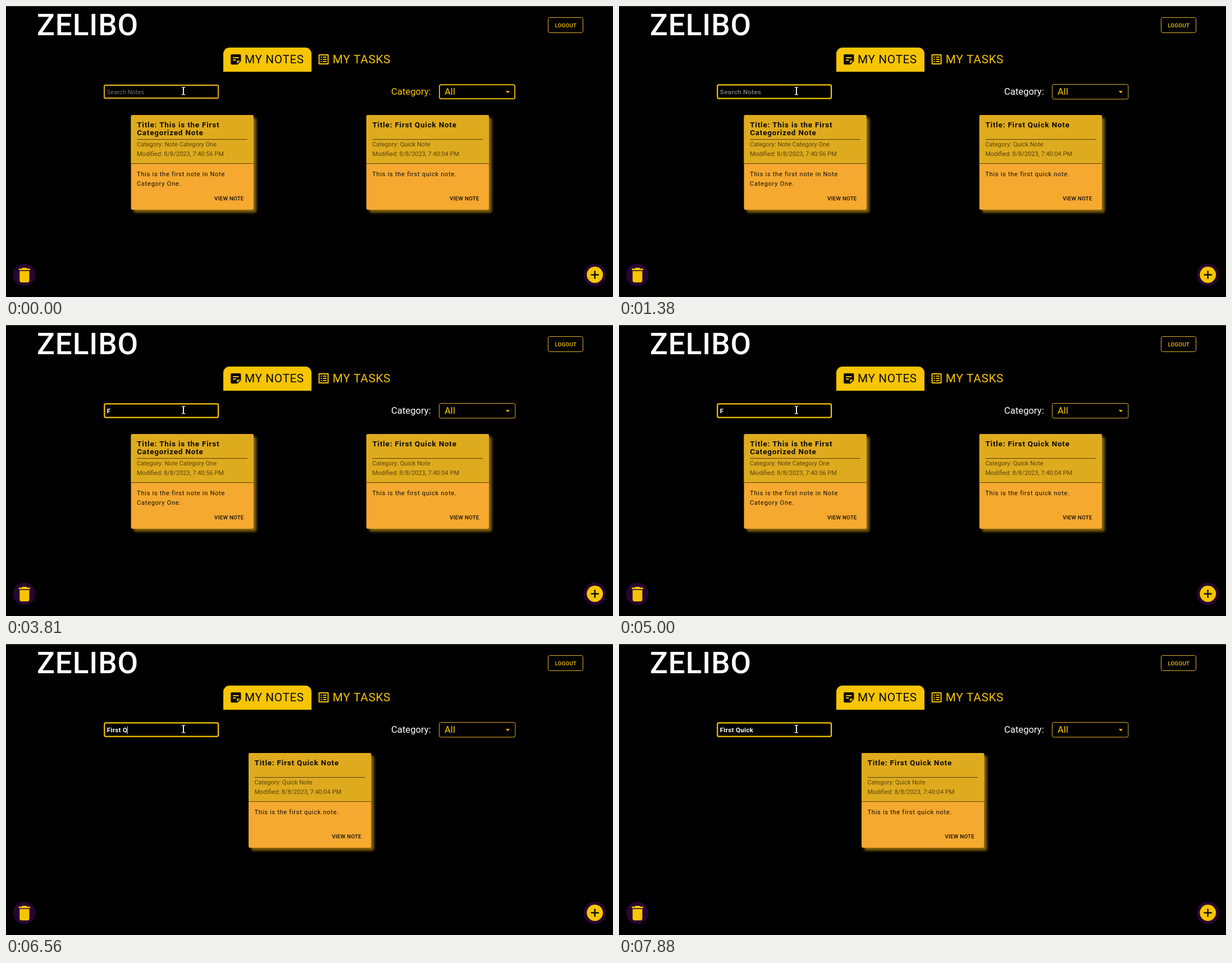
Recreate the animation shown at these times as an HTML page with a canvas. Size 1081 px wide and 518 px high, loop 8000 ms.

```html
<!DOCTYPE html>
<html lang="en">
<head>
<meta charset="utf-8">
<title>Notes search</title>
<style>
  html, body { margin: 0; width: 100%; height: 100%; overflow: hidden; background: #000; }
  canvas { display: block; }
</style>
</head>
<body>
<canvas id="stage" width="1081" height="518"></canvas>
<script>
const ctx = document.getElementById('stage').getContext('2d');
const LOOP = 8000;
const YELLOW = '#f7c504';
const GOLD = '#e0b028';
const PURPLE = '#270530';

const ICONS = {
  note: new Path2D('M19 3H4.99C3.89 3 3 3.9 3 5l.01 14c0 1.1.89 2 1.99 2h10l6-6V5c0-1.1-.9-2-2-2zM7 8h10v2H7V8zm5 6H7v-2h5v2zm2 5.5V14h5.5L14 19.5z'),
  list: new Path2D('M19 5v14H5V5h14m1.1-2H3.9c-.5 0-.9.4-.9.9v16.2c0 .4.4.9.9.9h16.2c.4 0 .9-.5.9-.9V3.9c0-.5-.5-.9-.9-.9zM11 7h6v2h-6V7zm0 4h6v2h-6v-2zm0 4h6v2h-6zM7 7h2v2H7zm0 4h2v2H7zm0 4h2v2H7z'),
  trash: new Path2D('M6 19c0 1.1.9 2 2 2h8c1.1 0 2-.9 2-2V7H6v12zM19 4h-3.5l-1-1h-5l-1 1H5v2h14V4z')
};

// [start, typed text, caret visible]
const TYPING = [
  [0, '', false], [750, '', true], [1380, '', false],
  [2000, 'F', true], [2630, 'F', false], [3190, 'F', true],
  [3810, 'F', false], [4440, 'F', true], [5000, 'F', false],
  [5190, 'First', true], [5810, 'First', false], [6060, 'First ', true],
  [6560, 'First Q', true], [6810, 'First Qu', true], [7060, 'First Qui', true],
  [7130, 'First Quic', true], [7380, 'First Quick', true], [7880, 'First Quick', false]
];

const NOTES = [
  {
    title: ['Title: This is the First', 'Categorized Note'],
    meta: ['Category: Note Category One', 'Modified: 8/8/2023, 7:40:56 PM'],
    body: ['This is the first note in Note', 'Category One.']
  },
  {
    title: ['Title: First Quick Note'],
    meta: ['Category: Quick Note', 'Modified: 8/8/2023, 7:40:04 PM'],
    body: ['This is the first quick note.']
  }
];

function text(str, x, y, size, color, weight = 400, spacing = 0) {
  ctx.font = `${weight} ${size}px Roboto, sans-serif`;
  ctx.letterSpacing = spacing + 'px';
  ctx.fillStyle = color;
  ctx.fillText(str, x, y);
  return ctx.measureText(str).width;
}

function lines(list, x, y, pitch, ...style) {
  list.forEach((s, i) => text(s, x, y + i * pitch, ...style));
}

function rect(x, y, w, h, color) {
  ctx.fillStyle = color;
  ctx.fillRect(x, y, w, h);
}

function box(x, y, w, h, radius) {
  ctx.beginPath();
  ctx.roundRect(x, y, w, h, radius);
}

function outline(x, y, w, h, radius, color, width) {
  box(x, y, w, h, radius);
  ctx.strokeStyle = color;
  ctx.lineWidth = width;
  ctx.stroke();
}

function disc(x, y, r, color) {
  ctx.fillStyle = color;
  ctx.beginPath();
  ctx.arc(x, y, r, 0, Math.PI * 2);
  ctx.fill();
}

function icon(path, x, y, scale, color) {
  ctx.save();
  ctx.translate(x, y);
  ctx.scale(scale, scale);
  ctx.fillStyle = color;
  ctx.fill(path, 'evenodd');
  ctx.restore();
}

function drawHeader() {
  rect(0, 0, 1081, 1, '#3b4d40');
  text('ZELIBO', 55, 52, 53, '#fff', 500, 0.9);
  outline(965.5, 20.5, 62, 27, 3, GOLD, 1);
  text('LOGOUT', 977.4, 37.5, 9.7, YELLOW, 500, 0.28);

  ctx.fillStyle = YELLOW;
  box(387, 74, 157, 43, [11, 11, 0, 0]);
  ctx.fill();
  icon(ICONS.note, 397.2, 83, 1.01, '#0a0a0a');
  text('MY NOTES', 425, 102, 20.8, '#0a0a0a', 400, 0.6);
  icon(ICONS.list, 553.6, 83, 1, YELLOW);
  text('MY TASKS', 581.8, 102, 20.8, YELLOW, 400, 0.6);
}

function drawSearch(typed, caret, focused) {
  if (focused) outline(175.3, 140.4, 202.8, 24.2, 2.5, YELLOW, 2.2);
  else outline(175, 141, 203, 23, 1, '#f0b922', 1.8);

  const x = 179.7, y = 156.8;
  const style = focused ? [11.6, '#fff', 700, 0.3] : [11.1, '#fff', 400, 0];
  const width = typed ? text(typed, x, y, ...style) : 0;
  if (!typed) {
    style[1] = '#707070';
    text('Search Notes', x, y, ...style);
  }
  if (caret) rect(Math.round(x + width), 146, 1, 14, '#d8d8d8');
}

function drawSelect(focused) {
  text('Category:', 686, 158, 16.65, focused ? YELLOW : '#fff');
  if (focused) outline(772, 140.2, 134.2, 25, 3, YELLOW, 1.7);
  else outline(771.5, 139.5, 135.4, 26.3, 3, GOLD, 1);
  text('All', 781, 158, 16.65, YELLOW);
  ctx.fillStyle = YELLOW;
  ctx.beginPath();
  ctx.moveTo(889.8, 151.2);
  ctx.lineTo(897.2, 151.2);
  ctx.lineTo(893.5, 155);
  ctx.fill();
}

function drawCard(note, x) {
  ctx.save();
  ctx.translate(x, 0);

  ctx.save();
  ctx.shadowColor = '#80620a';
  ctx.shadowOffsetX = ctx.shadowOffsetY = 5;
  ctx.shadowBlur = 4;
  ctx.fillStyle = '#f5a930';
  box(0, 194, 218.3, 168.7, 3);
  ctx.fill();
  ctx.restore();

  ctx.fillStyle = '#dfab1e';
  box(0, 194, 218.3, 86.5, [3, 3, 0, 0]);
  ctx.fill();
  rect(10.7, 237, 196.5, 1, 'rgba(0,0,0,.65)');
  rect(0, 280, 218.3, 1, 'rgba(0,0,0,.6)');

  lines(note.title, 10.6, 216, 14, 13.5, '#0c0a02', 700, 0.78);
  lines(note.meta, 10.4, 250.4, 16.6, 11, 'rgba(0,0,0,.6)');
  lines(note.body, 10.5, 303.4, 16.6, 11.1, '#140e02', 400, 0.7);
  outline(136.7, 330.5, 75.3, 26, 3, '#f6b223', 1);
  text('VIEW NOTE', 148.5, 346.4, 9.7, '#140e02', 500, 0.28);
  ctx.restore();
}

function drawActions() {
  disc(32.5, 478.5, 20, PURPLE);
  icon(ICONS.trash, 15.6, 461.7, 1.44, YELLOW);
  disc(1048.7, 478.5, 20, PURPLE);
  disc(1048.7, 478.5, 14.4, YELLOW);
  rect(1041.6, 477.3, 14.2, 2.4, '#0a0a0a');
  rect(1047.5, 471.4, 2.4, 14.2, '#0a0a0a');
}

function drawPointer() {
  rect(315, 145, 2, 12.6, '#f2f2f2');
  for (const y of [144, 157]) {
    rect(313, y, 2.6, 1.4, '#f2f2f2');
    rect(316.4, y, 2.6, 1.4, '#f2f2f2');
  }
}

function draw(t) {
  const [start, typed, caret] = TYPING.findLast(step => t >= step[0]);
  const searching = start > 0;
  rect(0, 0, 1081, 518, '#000');
  drawHeader();
  drawSearch(typed, caret, searching);
  drawSelect(!searching);
  if (typed.includes('Q')) {
    drawCard(NOTES[1], 432);
  } else {
    drawCard(NOTES[0], 222.6);
    drawCard(NOTES[1], 641.8);
  }
  drawActions();
  drawPointer();
}

const origin = performance.now();
function tick() {
  draw((performance.now() - origin) % LOOP);
  requestAnimationFrame(tick);
}
tick();
</script>
</body>
</html>
```
